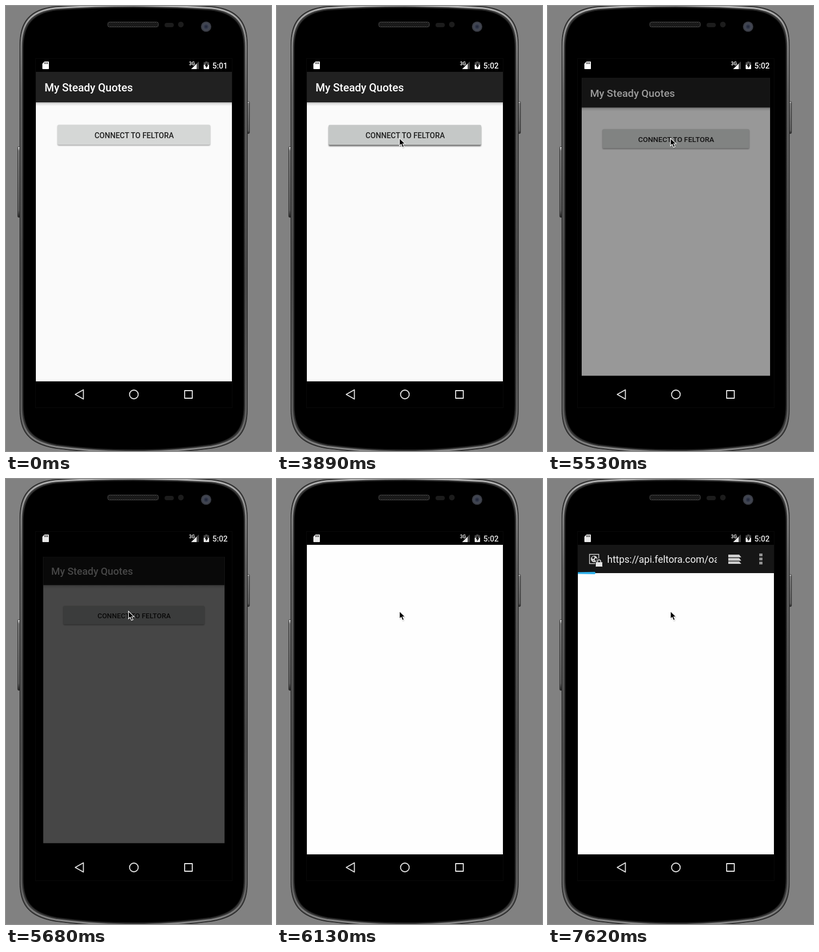
Animation, 488 px wide and 818 px high, one loop 8000 ms. Source, as an HTML page:

```html
<!DOCTYPE html>
<html lang="en">
<head>
<meta charset="utf-8">
<title>Phone login</title>
<style>
html, body { margin: 0; width: 100%; height: 100%; overflow: hidden; background: #818181; }
svg { display: block; width: 488px; height: 818px; font-family: Roboto, sans-serif; }
.medium { font-weight: 500; }
</style>
</head>
<body>
<svg viewBox="0 0 488 818">
  <defs>
    <path id="shell" d="M25.5 72C25.5 30 42 6 90 1Q235 -8 380 1C428 6 444.5 30 444.5 72V740C444.5 782 430 804 380 813Q235 832 90 813C40 804 25.5 782 25.5 740Z"/>
    <linearGradient id="rim" x2="0" y2="1">
      <stop offset="0" stop-color="#b4b4b4"/>
      <stop offset=".07" stop-color="#8c8c8c"/>
      <stop offset=".2" stop-color="#686868"/>
      <stop offset=".6" stop-color="#4c4c4c"/>
      <stop offset=".92" stop-color="#626262"/>
      <stop offset="1" stop-color="#8a8a8a"/>
    </linearGradient>
    <linearGradient id="key" x2="0" y2="1">
      <stop offset="0" stop-color="#ddd"/>
      <stop offset=".06" stop-color="#777"/>
      <stop offset=".9" stop-color="#5c5c5c"/>
      <stop offset="1" stop-color="#222"/>
    </linearGradient>
    <linearGradient id="drop" x2="0" y2="1">
      <stop offset="0" stop-opacity=".3"/>
      <stop offset=".4" stop-opacity=".1"/>
      <stop offset="1" stop-opacity="0"/>
    </linearGradient>
    <radialGradient id="lens">
      <stop offset="0" stop-color="#1d2233"/>
      <stop offset=".35" stop-color="#343a4c"/>
      <stop offset=".6" stop-color="#454954"/>
      <stop offset="1" stop-color="#33353d"/>
    </radialGradient>
    <pattern id="mesh" width="4" height="4" patternUnits="userSpaceOnUse">
      <rect width="4" height="4" fill="#101010"/>
      <circle cx="1" cy="1" r=".8" fill="#3c3c3c"/>
      <circle cx="3" cy="3" r=".8" fill="#3c3c3c"/>
    </pattern>
    <filter id="soft" x="-10%" y="-30%" width="120%" height="180%"><feGaussianBlur stdDeviation="1.2"/></filter>
    <clipPath id="urlClip"><rect x="108" y="130" width="203" height="40"/></clipPath>
  </defs>

  <rect width="488" height="818" fill="#818181"/>
  <g stroke="#333" stroke-width="1" fill="url(#key)">
    <rect x="21.5" y="258.5" width="6" height="130" rx="2"/>
    <rect x="442.5" y="175.5" width="6" height="59" rx="2"/>
  </g>
  <g id="body">
    <use href="#shell" fill="#3a3a3a" stroke="#242424"/>
    <use href="#shell" fill="none" stroke="url(#rim)" stroke-width="3" transform="translate(235 407) scale(.988 .993) translate(-235 -407)"/>
    <use href="#shell" fill="#000" stroke="#1c1c1c" stroke-width="1.5" transform="translate(235 407) scale(.97 .984) translate(-235 -407)"/>
  </g>
  <rect x="187.5" y="29.5" width="93" height="9" rx="3" fill="url(#mesh)" stroke="#4a4a4a"/>
  <rect x="292" y="31" width="17" height="8" rx="4" fill="#1c1c1c"/>
  <circle cx="322" cy="34" r="5.2" fill="#1c1c1c"/>
  <circle cx="368.5" cy="38" r="9.6" fill="url(#lens)"/>
  <rect x="54.5" y="96.5" width="362" height="642" fill="none" stroke="#0a0a0a"/>

  <g id="status" fill="#fff">
    <path d="M71 102H78Q79 102 79 103V115Q79 116 78 116H68Q67 116 67 115V106Z"/>
    <path d="M71.5 103.5v3M74 103.5v3M76.5 103.5v3" stroke="#000" stroke-width="1.2"/>
    <text x="337" y="108.5" font-size="8.5" font-weight="700">3G</text>
    <path d="M355 102V116H341Z" opacity=".3"/>
    <path d="M351 106V116H341Z"/>
    <path d="M364 103.5H367V102H371V103.5H374V109H364Z" opacity=".32"/>
    <path d="M364 108H374V115Q374 116 373 116H365Q364 116 364 115Z"/>
    <path d="M370 104.5L366 110.5H368.5V114.5L372.5 108.5H370Z" fill="#000"/>
    <text id="clock" class="medium" x="380" y="114.8" font-size="14.3"></text>
  </g>

  <g id="app">
    <rect x="55" y="121" width="361" height="569" fill="#fafafa"/>
    <rect x="55" y="177" width="361" height="7" fill="url(#drop)"/>
    <rect x="55" y="121" width="361" height="56" fill="#212121"/>
    <text class="medium" x="71" y="157" font-size="20" fill="#fff">My Steady Quotes</text>
    <rect id="shade" x="95" width="281" height="37" rx="2" filter="url(#soft)"/>
    <rect id="button" x="95" y="218.5" width="281" height="36.5" rx="2"/>
    <text class="medium" x="236" y="243" font-size="14" text-anchor="middle" fill="#1f1f1f">CONNECT TO FELTORA</text>
  </g>

  <rect id="sheet" x="55" width="361" fill="#fefefe"/>

  <rect id="bar" x="55" y="121" width="361" fill="#161616"/>
  <g id="tools">
    <rect x="76.5" y="138.5" width="17" height="17" fill="#161616" stroke="#d8d8d8" stroke-width="1.4"/>
    <circle cx="85" cy="147" r="6" fill="#d8d8d8"/>
    <path d="M81 144l3-2 2 2-2 3-2 0ZM86 147l3-2 1 3-3 3ZM82 149l2 0 1 2Z" fill="#161616"/>
    <path d="M91 153V151.5a3 3 0 0 1 6 0V153" fill="none" stroke="#161616" stroke-width="4.5"/>
    <rect x="87.5" y="152.5" width="13" height="9" rx="1" fill="#e4e4e4" stroke="#161616"/>
    <path d="M91 153V151.5a3 3 0 0 1 6 0V153" fill="none" stroke="#e4e4e4" stroke-width="1.6"/>
    <text x="109" y="153.8" font-size="18" fill="#f2f2f2" clip-path="url(#urlClip)">https://api.feltora.com/oauth</text>
    <path id="stack" d="M332 139H352L356 144H332ZM332 145.3H352L356 150.3H332ZM332 151.6H352L356 156H332Z" fill="#cfcfcf"/>
    <path d="M389 137h6v5h-6ZM389 144.5h6v5h-6ZM389 152h6v5h-6Z" fill="#929292"/>
    <path d="M55 171.3L86 170.8Q89 173 86 175L55 174.6Z" fill="#2fb0ea"/>
  </g>

  <g fill="none" stroke="#e8e8e8" stroke-width="1.8" stroke-linejoin="round">
    <path d="M127.5 714L142.5 705.5V722.5Z"/>
    <circle cx="235.5" cy="714" r="8"/>
    <rect x="329" y="707" width="14" height="14"/>
  </g>

  <g id="cursor">
    <path d="M0 0V14L3.2 11.2L5.6 16.8L8.4 15.6L6 10.2H10.4Z" fill="#000" opacity=".25" transform="translate(.6 1.6)" filter="url(#soft)"/>
    <path d="M0 0V14L3.2 11.2L5.6 16.8L8.4 15.6L6 10.2H10.4Z" fill="#000" stroke="#fff" stroke-width="1.1"/>
  </g>
</svg>
<script>
const LOOP = 8000;
const el = id => document.getElementById(id);
const set = (id, attrs) => {
  for (const k in attrs) el(id).setAttribute(k, attrs[k]);
};
const show = (id, on) => set(id, { visibility: on ? "visible" : "hidden" });

// Each track holds [start time, ...values]; values stay until the next entry.
const pointer = [[0, -40, -40], [1490, 251, 323], [1640, 220, 264], [1790, 223.5, 250], [1940, 225.5, 243]];
const closing = [[0, 1, 1], [5530, 0.961, 0.608], [5680, 0.925, 0.28], [5830, 0.9, 0.07], [6130, 0.9, 0]];
const sheetTop = [[0, 690], [5830, 218], [5980, 123.5], [6130, 121]];
const at = (track, t) => track.filter(e => e[0] <= t).pop().slice(1);

function draw(t) {
  const [x, y] = at(pointer, t);
  set("cursor", { transform: `translate(${x} ${y})` });
  el("clock").textContent = t < 1790 ? "5:01" : "5:02";
  set("status", { fill: t < 5680 ? "#fff" : "#e9e9e9" });

  const pressed = t >= 3890 && t < 4190;
  set("button", { fill: pressed ? "#c5c8c7" : "#d5d7d6" });
  set("shade", { y: pressed ? 221 : 219.5, opacity: pressed ? 0.5 : 0.36 });

  const [scale, alpha] = at(closing, t);
  const drop = scale < 1 ? 0.7 : 0;
  set("app", {
    transform: `translate(235.5 ${406.5 + drop}) scale(${scale}) translate(-235.5 -406.5)`,
    opacity: alpha
  });

  const [top] = at(sheetTop, t);
  set("sheet", { y: top, height: 690 - top });
  set("bar", { height: t < 7620 ? 56 : 52 });
  show("bar", t >= 7470);
  show("tools", t >= 7620);
}

const start = performance.now();
function tick() {
  draw((performance.now() - start) % LOOP);
  requestAnimationFrame(tick);
}
tick();
</script>
</body>
</html>
```
